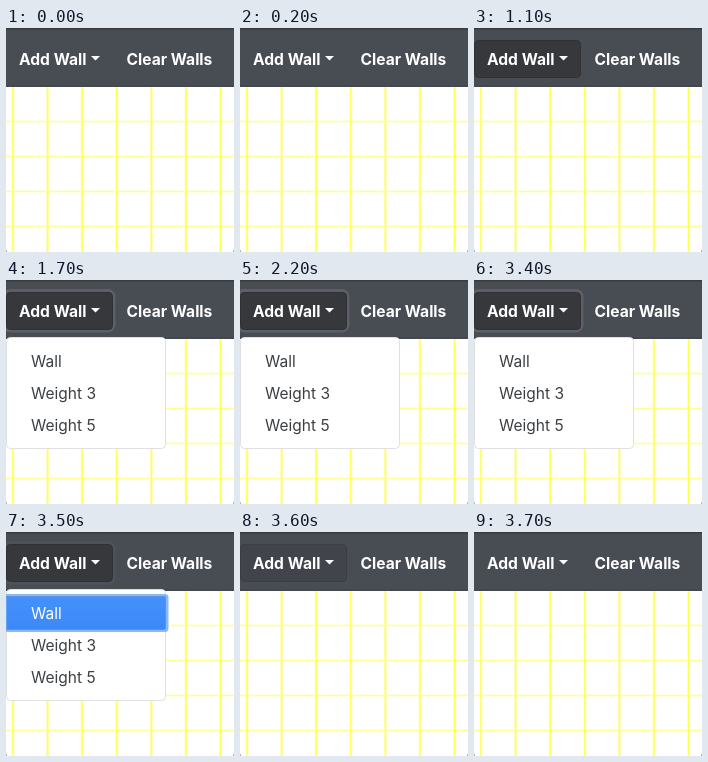
Recreate the animation shown at these times as an HTML page with a canvas. Size 228 px wide and 224 px high, loop 4600 ms.

```html
<!DOCTYPE html>
<html lang="en">
<head>
<meta charset="utf-8">
<title>Add Wall menu</title>
<style>
  html, body { margin: 0; width: 100%; height: 100%; overflow: hidden; background: #fff; }
  canvas { display: block; width: 228px; height: 224px; }
</style>
</head>
<body>
<canvas id="stage" width="228" height="224"></canvas>
<script>
const ctx = document.getElementById('stage').getContext('2d');
const WIDTH = 228, HEIGHT = 224, LOOP = 4600;
const HOVER = 1100, OPEN = 1700, PRESS = 3500, CLOSE = 3600, REST = 3700;
const ITEMS = ['Wall', 'Weight 3', 'Weight 5'];

function rect(color, x, y, w, h) {
  ctx.fillStyle = color;
  ctx.fillRect(x, y, w, h);
}

function box(x, y, w, h, radius, fill, stroke, line = 1) {
  ctx.beginPath();
  ctx.roundRect(x, y, w, h, radius);
  if (fill) {
    ctx.fillStyle = fill;
    ctx.fill();
  }
  if (stroke) {
    ctx.strokeStyle = stroke;
    ctx.lineWidth = line;
    ctx.stroke();
  }
}

function label(text, x, y, weight, size, color) {
  ctx.font = `${weight} ${size}px Inter, sans-serif`;
  ctx.fillStyle = color;
  ctx.fillText(text, x, y);
}

// Each grid line has a soft pale edge around a brighter core
function drawGrid() {
  rect('#fff', 0, 0, WIDTH, HEIGHT);
  for (let i = 1; i < 5; i++) {
    const y = 58.5 + i * 35;
    rect('#ffffdc', 0, y - 1.5, WIDTH, 3);
    rect('#ffff96', 0, y - 0.5, WIDTH, 1);
  }
  for (let i = 0; i < 7; i++) {
    const x = 7 + i * 34.6;
    rect('#ffffc8', x - 1.5, 59, 3, HEIGHT - 59);
    rect('#ffff58', x - 0.75, 59, 1.5, HEIGHT - 59);
  }
  // Rounded lower corners of the window
  for (const x of [0, WIDTH - 1]) rect('#b5b5b5', x, HEIGHT - 2, 1, 2);
}

function drawBar() {
  rect('#484c53', 0, 0, WIDTH, 59);
  rect('#3b3c3f', 0, 0, WIDTH, 1);
  rect('#424346', 0, 1, WIDTH, 1);
  rect('#44474d', 0, 57, WIDTH, 2);
}

function drawButton(alpha, ring) {
  ctx.globalAlpha = alpha;
  if (ring) box(-2, 10.5, 110, 40.5, 6, null, `rgba(92, 95, 101, ${ring})`, 3);
  box(0.5, 12.5, 106, 37, 4, '#37383c', '#303134');
  ctx.globalAlpha = 1;
}

function drawCaptions() {
  label('Add Wall', 13, 37, 700, 15.6, '#fff');
  label('Clear Walls', 120.5, 37, 700, 15.6, '#fff');
  ctx.fillStyle = '#fff';
  ctx.beginPath();
  ctx.moveTo(85, 28);
  ctx.lineTo(94, 28);
  ctx.lineTo(89.5, 32.5);
  ctx.fill();
}

function drawMenu(pressed) {
  box(0.5, 57.5, 159, 111, 4, '#fff', '#e0e0e0');
  if (pressed) {
    const blue = ctx.createLinearGradient(0, 65, 0, 97);
    blue.addColorStop(0, '#4590fb');
    blue.addColorStop(1, '#3b89f8');
    box(-1, 63.5, 162, 35, 2, blue, '#8db8f1', 3);
    box(-1, 64.5, 160.5, 33, 1, null, '#5b93e4');
  }
  ITEMS.forEach((item, i) => {
    label(item, 25, 87 + i * 32, 400, 15.5, pressed && i === 0 ? '#fff' : '#3c3f42');
  });
}

function draw(t) {
  const open = t >= OPEN && t < CLOSE;
  drawGrid();
  drawBar();
  if (t >= HOVER && t < REST) {
    const ring = !open ? 0 : t < PRESS ? 1 : 0.35;
    drawButton(t < CLOSE ? 1 : 0.4, ring);
  }
  drawCaptions();
  if (open) drawMenu(t >= PRESS);
}

const start = performance.now();
function tick() {
  draw((performance.now() - start) % LOOP);
  requestAnimationFrame(tick);
}
tick();
</script>
</body>
</html>
```
